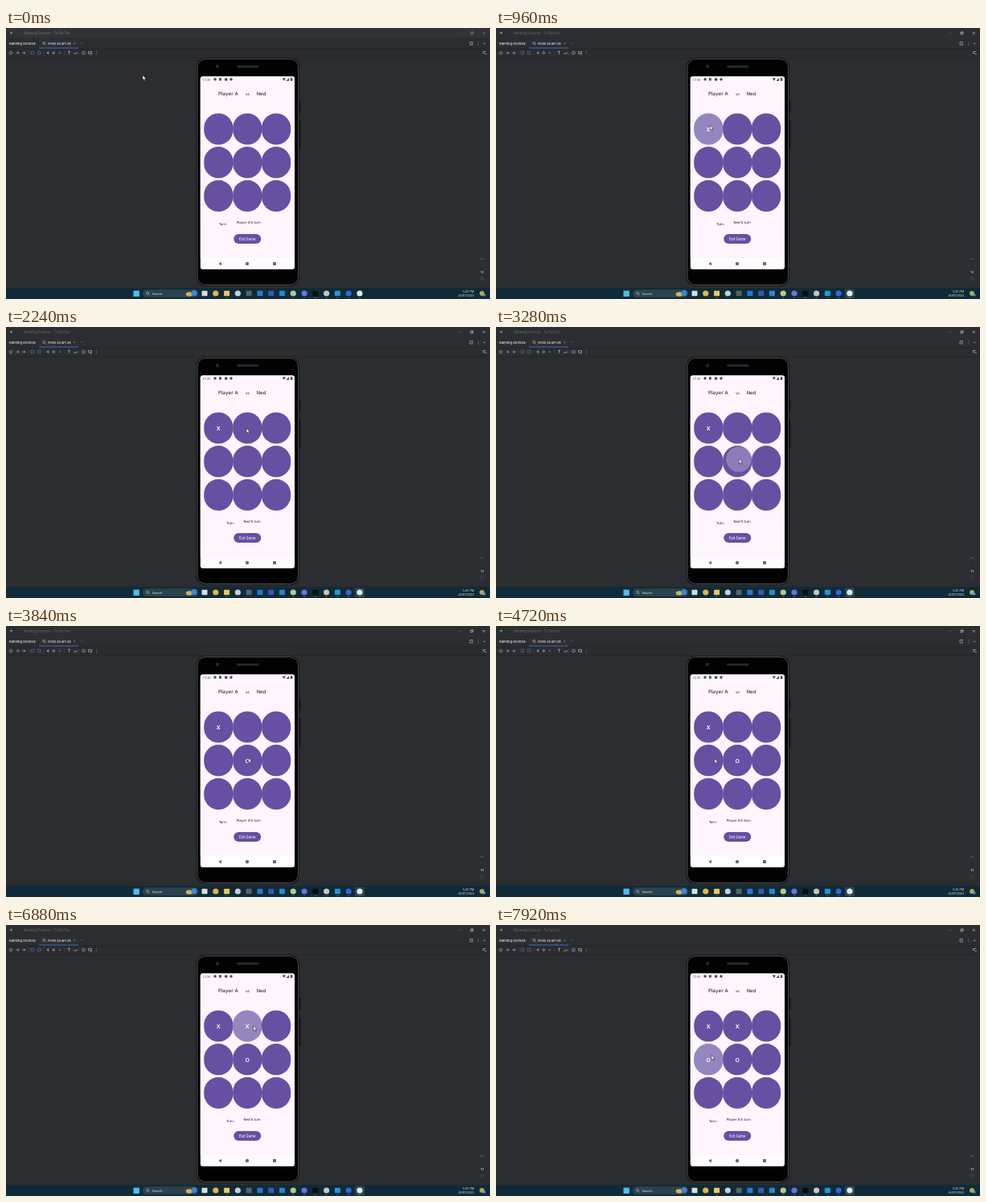
Write an HTML page that moves like this. It is 602 by 338 pixels and loops after 8 s.

```html
<!DOCTYPE html>
<html lang="en">
<head>
<meta charset="utf-8">
<title>Noughts and crosses on a phone</title>
<style>
html, body { margin: 0; width: 100%; height: 100%; overflow: hidden; background: #2b2d31; }
svg { display: block; width: 100vw; height: 100vh; }
text { font-family: Inter, sans-serif; fill: #e6e8ec; }
.game { font-family: "DejaVu Sans", sans-serif; fill: #15121a; }
.mark { font: 500 7.8px Roboto, sans-serif; fill: #fff; text-anchor: middle; }
.small { font: 4.1px "Open Sans", sans-serif; fill: #f0f4f6; }
.date { font-size: 3.7px; text-anchor: end; }
.line { fill: none; stroke: #c6c9cf; stroke-width: .6; }
</style>
</head>
<body>
<svg viewBox="0 0 602 338" preserveAspectRatio="none">
  <rect width="602" height="338" fill="#2b2d31"/>

  <!-- window bars -->
  <rect id="titleBar" width="602" height="12.5"/>
  <circle cx="6.5" cy="6" r="1.5" fill="#3d9c78"/>
  <text id="title" x="22" y="7.6" font-size="4.2">Running Devices - TicTacToe</text>
  <g id="controls" class="line">
    <path d="M563.5 6.5h3" opacity=".3"/>
    <path d="M592.8 4.9l3 3M595.8 4.9l-3 3"/>
    <path d="M577.8 5.6h2.4V8h-2.4zM578.6 5.6v-.8h2.4v2.4h-.8"/>
  </g>
  <text x="4" y="20.7" font-size="4.1" font-weight="500">Running Devices</text>
  <rect x="41" y="13" width="49" height="12" fill="#2d2f33"/>
  <rect x="41" y="24.6" width="49" height="1.1" fill="#4679d8"/>
  <g class="line">
    <circle cx="47.2" cy="18.8" r="1.4"/>
    <path d="M48.2 19.9l1.5 1.6"/>
    <path d="M84.2 18.2l1.8 1.8M86 18.2l-1.8 1.8M93 18.4l1 1 1-1" opacity=".6"/>
    <path d="M577 17.5h4M577 17.5v3.5h4M579 19.3h2M587.5 17.3v.6M587.5 19v.6M587.5 20.7v.6M593.5 19.3h3"/>
  </g>
  <text x="52" y="20.6" font-size="3.85" font-weight="500">Fenlo 3a API 28</text>
  <path d="M0 26h602M0 37h602" stroke="#222428" stroke-width=".7"/>
  <g class="line">
    <path d="M5 29.6a1.8 1.8 0 1 0 2 0M6 28.6v2M12.5 31h3.4M14.5 29.4l1.6 1.6-1.6 1.6M20.3 31h3.4M22.3 29.4l1.6 1.6-1.6 1.6"/>
    <path d="M52.8 29.6v2.8l-2-1.4zM66.2 30l1.2 1-1.2 1M112.5 29v.6M112.5 30.8v.6M112.5 32.6v.6"/>
    <path d="M31 29.2h3.5v3.5H31zM39.4 29.2h3.5v3.5h-3.5z" stroke="#5578b8"/>
    <circle cx="59.3" cy="31" r="1.3"/><circle cx="96.5" cy="31" r="1.8"/>
    <path d="M77 29.3h3M78.5 29v3.8M84 32h4v-2M102.5 29.4h4v2.5h-4zM105 33h2M593.5 29.5h3.5M593.5 29.5v2h2M595.5 32.5h2.5"/>
  </g>
  <path d="M28 29v4M46.8 29v4M72.8 29v4M91.2 29v4" stroke="#494c51" stroke-width=".5"/>

  <!-- zoom controls -->
  <rect x="588" y="283.5" width="8.5" height="33" rx="1" fill="#2b2d31" stroke="#393c41" stroke-width=".4"/>
  <path d="M590 288h4" class="line" opacity=".6"/>
  <text x="592.2" y="305.5" font-size="3.5" font-weight="600" text-anchor="middle">1:1</text>
  <path d="M590.7 310.7h3v3h-3z" class="line" opacity=".25"/>

  <!-- phone -->
  <path d="M365.6 91v15M365.6 115v36" stroke="#131415" stroke-width="1.8"/>
  <rect x="236.6" y="37.4" width="128.4" height="284.4" rx="11.5" fill="#0b0c0d"/>
  <rect x="238" y="38.7" width="125.6" height="281.8" rx="10.3" fill="#020202" stroke="#66686b" stroke-width=".8"/>
  <rect x="287" y="46.8" width="27.5" height="2.6" rx="1.3" fill="#292b2d"/>
  <circle cx="263" cy="48" r="2.4" fill="#1c1e22"/><circle cx="263" cy="48" r="1" fill="#30343a"/>
  <rect x="241.8" y="60.5" width="117.2" height="240.5" rx="3" fill="#fffcff"/>
  <path d="M241.8 287V63.5q0-3 3-3h111.2q3 0 3 3V287z" fill="#fef5ff"/>
  <text x="244.5" y="65.8" font-size="4" style="font-family:Roboto,sans-serif;fill:#55515a">12:30</text>
  <g fill="#4c4852">
    <circle cx="260" cy="64" r="1.7"/><rect x="265" y="62.3" width="2.8" height="3.4" rx=".6"/>
    <rect x="272" y="62.5" width="3.2" height="3.2" rx=".4"/><circle cx="280" cy="64" r="1.7"/>
    <path d="M343.8 62.7q2-1 4 0l-2 3.4zM352 62.3v3.6h-3.6zM353.8 62.3h2.4v3.8h-2.4z"/>
  </g>
  <text class="game" x="264" y="84.4" font-size="6">Player A</text>
  <text class="game" x="298" y="84.3" font-size="4.4">vs</text>
  <text class="game" x="311.7" y="84.4" font-size="5.8">Ned</text>
  <text class="game" id="turnLabel" y="245.5" font-size="4">Turn:</text>
  <text class="game" id="turnName" y="244.2" font-size="4.05"></text>
  <g id="board"></g>
  <rect x="283.2" y="257" width="34" height="12" rx="6" fill="#674fa2"/>
  <text x="300.2" y="264.7" font-size="4.5" text-anchor="middle" style="font-family:Roboto,sans-serif;fill:#fff">Exit Game</text>
  <g fill="#6d6b70">
    <path d="M268 291.8v4.4l-3.8-2.2z"/><circle cx="300" cy="294" r="2.2"/>
    <rect x="332" y="292" width="4" height="4" rx=".3"/>
  </g>

  <!-- taskbar -->
  <rect y="324" width="602" height="14" fill="#102b37"/>
  <rect x="158.5" y="327.6" width="7.4" height="7.4" fill="#4cbdf0"/>
  <rect x="170" y="326.3" width="69" height="9.8" rx="4.9" fill="#2a434f"/>
  <g class="line"><circle cx="176" cy="330.7" r="1.5"/><path d="M177.1 331.8l1.4 1.4"/></g>
  <text class="small" x="181.7" y="332.7">Search</text>
  <ellipse cx="228" cy="332" rx="4.3" ry="2.8" fill="#d8b057"/>
  <circle cx="234" cy="330.7" r="3.6" fill="#3a86d6"/>
  <rect id="activeApp" x="434" y="325.5" width="12" height="11.5" rx="1.3" fill="#2b4652"/>
  <g id="apps"></g>
  <text class="small date" x="582" y="330">5:25 PM</text>
  <text class="small date" x="582" y="335.3">26/07/2023</text>
  <circle cx="592" cy="331" r="3" fill="#bca353"/>
  <circle cx="594.8" cy="333" r="1.8" fill="#3c9de0"/>

  <path id="pointer" d="M0 0v5.8l1.4-1.2 1 2.2 1.1-.5-1-2.1h1.9z" fill="#fff" stroke="#111" stroke-width=".5"/>
</svg>
<script>
const LOOP = 8000, STEP = 80;
const $ = id => document.getElementById(id);

function add(parent, tag, attrs) {
  const el = document.createElementNS("http://www.w3.org/2000/svg", tag);
  for (const key in attrs) el.setAttribute(key, attrs[key]);
  return parent.appendChild(el);
}

// Pointer stops: time, x, y
const stops = [
  [0, 170, 59], [160, 170, 59], [720, 266, 121.5], [1200, 266, 121.5],
  [1840, 299, 126.5], [2320, 299, 126.5], [2960, 302.3, 164.5], [3760, 302.3, 164.5],
  [4560, 271.7, 165.5], [5200, 271.7, 165.5], [6320, 307.7, 126], [7040, 307.7, 126],
  [7600, 267.8, 162.5], [8000, 267.8, 162.5]
];

// One tap per turn; the mark appears when the button is released
const taps = [
  { cell: 0, mark: "X", down: 720, up: 880, x: 266, y: 123 },
  { cell: 4, mark: "O", down: 3160, up: 3360, x: 302, y: 165 },
  { cell: 1, mark: "X", down: 6600, up: 6760, x: 308, y: 127 },
  { cell: 3, mark: "O", down: 7660, up: 7820, x: 268, y: 164 }
];

const cells = Array.from({ length: 9 }, (_, i) => {
  const cx = 264.3 + i % 3 * 35.9, cy = 126 + Math.floor(i / 3) * 41.7;
  const shape = { x: cx - 18.05, y: cy - 19.6, width: 36.1, height: 39.2, rx: 18.05 };
  add($("board"), "rect", { ...shape, fill: "#674fa2" });
  const clip = add($("board"), "clipPath", { id: "cell" + i });
  add(clip, "rect", shape);
  const ripple = add($("board"), "circle", { "clip-path": `url(#cell${i})`, fill: "#fff" });
  const mark = add($("board"), "text", { class: "mark", x: cx, y: cy + 2.8 });
  return { ripple, mark };
});

const appColors = ["#d5dde1", "#dfb64a", "#edc65b", "#c5d0d6", "#56636b", "#2878cb", "#3759b4",
  "#2488d0", "#bdc58f", "#6673df", "#080b0d", "#c9c5bd", "#2594d8", "#2e66df", "#e3e9e9"];
const roundApps = [1, 3, 8, 9, 11, 13, 14];
appColors.forEach((fill, i) => {
  const x = 247 + i * 13.78;
  if (roundApps.includes(i)) add($("apps"), "circle", { cx: x, cy: 331, r: 3.6, fill });
  else add($("apps"), "rect", { x: x - 3.5, y: 327.8, width: 7, height: 6.5, rx: .7, fill });
  if (i > 7 || i === 2) add($("apps"), "rect", { x: x - 1.2, y: 336.4, width: 2.4, height: .6, rx: .3, fill: "#8da0a9" });
});

const clamp = v => Math.max(0, Math.min(1, v));
const mix = (a, b, k) => a + (b - a) * k;

function pointerAt(t) {
  const i = Math.max(1, stops.findIndex(s => s[0] > t));
  const [t0, x0, y0] = stops[i - 1], [t1, x1, y1] = stops[i];
  const u = clamp((t - t0) / (t1 - t0)), k = u * u * (3 - 2 * u);
  return [mix(x0, x1, k), mix(y0, y1, k)];
}

function draw(t) {
  const focused = t >= 800;
  $("titleBar").setAttribute("fill", focused ? "#2c2e32" : "#313337");
  $("title").setAttribute("opacity", focused ? .32 : .36);
  $("controls").setAttribute("opacity", focused ? 1 : .55);
  $("activeApp").setAttribute("opacity", focused ? 1 : 0);

  let played = 0;
  for (const { cell, mark, down, up, x, y } of taps) {
    const done = t >= up;
    played += done;
    cells[cell].mark.textContent = done ? mark : "";
    const grow = clamp((t - down) / 225), fade = clamp((t - up - 160) / 320);
    const ripple = cells[cell].ripple;
    ripple.setAttribute("cx", x);
    ripple.setAttribute("cy", y);
    ripple.setAttribute("r", mix(4, 38, grow ** 2 * .75 + grow * .25));
    ripple.setAttribute("opacity", t < down ? 0 : mix(.19, .31, grow) * (1 - fade));
  }
  const first = played % 2 === 0;
  $("turnLabel").setAttribute("x", first ? 265 : 274.4);
  $("turnName").setAttribute("x", first ? 286.8 : 295.5);
  $("turnName").textContent = first ? "Player A'S turn" : "Ned'S turn";
  $("pointer").setAttribute("transform", `translate(${pointerAt(t)})`);
}

function tick() {
  draw(Math.floor(performance.now() % LOOP / STEP) * STEP);
  requestAnimationFrame(tick);
}
tick();
</script>
</body>
</html>
```
